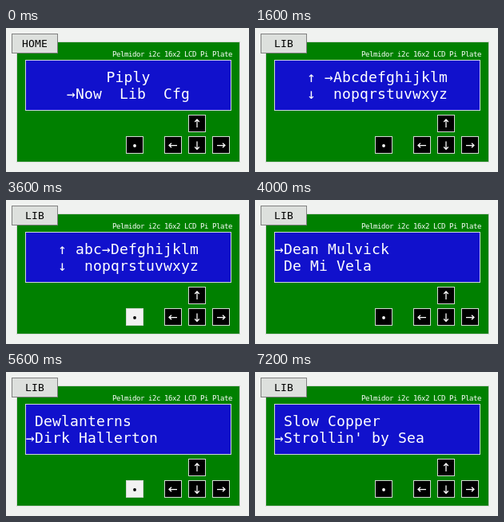
Animation, 304 px wide and 181 px high, one loop 8 s. Source, as an HTML page:

```html
<!DOCTYPE html>
<html lang="en">
<head>
<meta charset="utf-8">
<title>LCD menu</title>
<style>
  html, body { margin: 0; width: 100%; height: 100%; overflow: hidden; background: #f0f2f0; }
  body, #stage { font-family: "DejaVu Sans Mono", monospace; }
  #stage { position: absolute; left: 0; top: 0; width: 304px; height: 181px; overflow: hidden; }
  #stage > * { position: absolute; box-sizing: border-box; }
  .text { white-space: pre; letter-spacing: calc(var(--cell) - 1ch); }
  #board { left: 13px; top: 17px; width: 280px; height: 152px; background: #008000; border: 1px solid #ccd4cc; }
  #label { --cell: 8px; left: 7px; top: 7px; width: 58px; height: 25px; background: #dde0dd;
    border: 1px solid #808080; font-size: 13px; line-height: 23px; text-align: center; color: #000; }
  #title { --cell: 5px; right: 21px; top: 28px; font-size: 9px; line-height: 10px; color: #fff; }
  #lcd { left: 24px; top: 40px; width: 258px; height: 64px; padding-top: 10px;
    background: #1111cc; border: 1px solid #ccd4dd; color: #fff; }
  .row { --cell: 11px; height: 21px; font-size: 18px; line-height: 21px; }
  .centered { text-align: center; }
  .key { width: 22px; height: 22px; background: #000; border: 1px solid #d0d8d0; color: #fff; }
  .key.down { background: #f2f2f2; color: #000; }
  .key svg { display: block; width: 20px; height: 20px; }
</style>
</head>
<body>
<div id="stage">
  <div id="board"></div>
  <div id="label" class="text"></div>
  <div id="title" class="text">Pelmidor i2c 16x2 LCD Pi Plate</div>
  <div id="lcd">
    <div class="row text"></div>
    <div class="row text"></div>
  </div>
</div>
<script>
  const STEP = 400, LOOP = 8000;
  const stage = document.getElementById('stage');
  const label = document.getElementById('label');
  const lcd = document.getElementById('lcd');
  const rows = lcd.querySelectorAll('.row');

  const dot = '<circle cx="10" cy="11" r="1.9" fill="currentColor"/>';
  const arrow = (turn, x, y) =>
    `<path transform="translate(${x} ${y}) rotate(${turn})" d="M-5 0H5M2 -2.8L5 0L2 2.8"
      fill="none" stroke="currentColor" stroke-width="1.25"/>`;

  const keys = {};
  function addKey(name, x, y, icon) {
    const key = document.createElement('div');
    key.className = 'key';
    key.style.left = x + 'px';
    key.style.top = y + 'px';
    key.innerHTML = `<svg viewBox="0 0 20 20">${icon}</svg>`;
    stage.append(key);
    keys[name] = key;
  }
  addKey('up', 228, 109, arrow(-90, 10, 10));
  addKey('select', 150, 136, dot);
  addKey('left', 198, 136, arrow(180, 10, 10.5));
  addKey('down', 228, 136, arrow(90, 10, 10.5));
  addKey('right', 258, 136, arrow(0, 10, 10.5));

  const menu = (pick, key) => ({
    name: 'HOME', centered: true, key,
    lines: ['Piply', ['Now', 'Lib', 'Cfg'].map((s, i) => (i === pick ? '→' : ' ') + s).join(' ')]
  });

  const index = (n, key) => {
    const abc = 'abcdefghijklm';
    const line = abc.slice(0, n) + '→' + abc[n].toUpperCase() + abc.slice(n + 1);
    return { name: 'LIB', centered: true, key, lines: ['↑ ' + line, '↓  nopqrstuvwxyz'] };
  };

  const list = items => (top, pick, key) => ({
    name: 'LIB', centered: false, key,
    lines: [0, 1].map(i => (i === pick ? '→' : ' ') + items[top + i])
  });
  const artists = list(['Dean Mulvick', 'De Mi Vela', 'Dewlanterns', 'Dirk Hallerton']);
  const albums = list(['The Songs of Dirk', 'Slow Copper', "Strollin' by Sea"]);

  const steps = [
    menu(0), menu(0, 'right'), menu(1), menu(1, 'select'),
    index(0), index(0, 'right'), index(1, 'right'), index(2, 'right'), index(3), index(3, 'select'),
    artists(0, 0), artists(0, 0, 'down'), artists(0, 1, 'down'), artists(1, 1, 'down'), artists(2, 1, 'select'),
    albums(0, 0), albums(0, 0, 'down'), albums(0, 1, 'down'), albums(1, 1)
  ];

  let shown = -1;
  function show(i) {
    if (i === shown) return;
    shown = i;
    const step = steps[i];
    label.textContent = step.name;
    lcd.classList.toggle('centered', step.centered);
    rows.forEach((row, n) => { row.textContent = step.lines[n]; });
    for (const name in keys) keys[name].classList.toggle('down', name === step.key);
  }

  const start = performance.now();
  function tick() {
    const t = (performance.now() - start) % LOOP;
    show(Math.min(Math.floor(t / STEP), steps.length - 1));
    requestAnimationFrame(tick);
  }
  tick();
</script>
</body>
</html>
```
